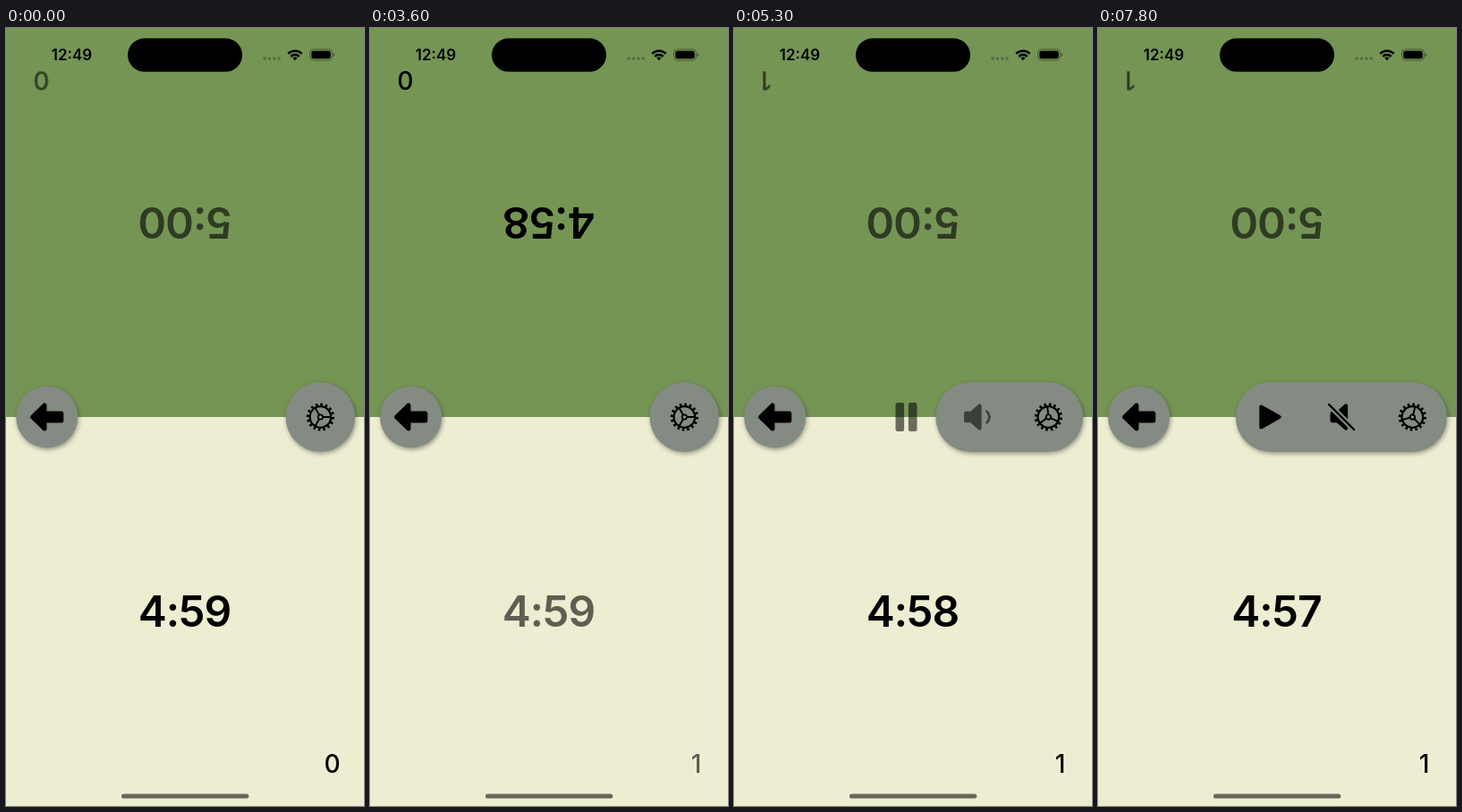
These frames come from a looping animation (400 px wide and 868 px high, 8 s). An HTML page:

```html
<!DOCTYPE html>
<html lang="en">
<head>
<meta charset="utf-8">
<title>Two-player clock</title>
<style>
  html, body { margin: 0; width: 100%; height: 100%; overflow: hidden; background: #ecedd1; }
  svg { display: block; width: 400px; height: 868px; }
  text { font-family: Inter, "Liberation Sans", sans-serif; text-anchor: middle; }
  .time { font-size: 48px; font-weight: 600; letter-spacing: -0.02em; }
  .count { font-size: 28px; font-weight: 500; }
  .button { fill: #848b83; filter: drop-shadow(1.5px 2px 2.5px rgba(0, 0, 0, .36)); }
  .solid { stroke: #000; stroke-linejoin: round; }
  .line { fill: none; stroke: #000; stroke-linecap: round; }
</style>
</head>
<body>
<svg viewBox="0 0 400 868">
  <defs>
    <path id="speaker" class="solid" stroke-width="4" d="M259 429.7H265L274.6 421.3V446.7L265 438.3H259Z"/>
  </defs>

  <rect width="400" height="868" fill="#ecedd1"/>
  <rect width="400" height="434" fill="#759555"/>

  <!-- status bar -->
  <text x="73.5" y="36" font-size="17" font-weight="600">12:49</text>
  <rect x="136" y="11.5" width="128" height="37.3" rx="18.65"/>
  <g opacity=".27">
    <circle cx="289" cy="34" r="1.8"/><circle cx="294.4" cy="34" r="1.8"/>
    <circle cx="299.8" cy="34" r="1.8"/><circle cx="305.2" cy="34" r="1.8"/>
  </g>
  <g fill="none" stroke="#000" stroke-width="2.5">
    <path d="M315.2 28.6A11 11 0 0 1 330.6 28.6"/>
    <path d="M318.2 31.8A6.7 6.7 0 0 1 327.6 31.8"/>
  </g>
  <path d="M320.3 33.5A3.8 3.8 0 0 1 325.5 33.5L322.9 36.2Z"/>
  <rect x="339.5" y="23.8" width="25" height="12.2" rx="3.9" fill="none" stroke="#000" opacity=".38"/>
  <rect x="341.2" y="25.5" width="21.6" height="8.8" rx="2.5"/>
  <path d="M365.7 27.8Q367.4 28.4 367.4 29.9T365.7 32Z" opacity=".42"/>

  <!-- players -->
  <g id="top">
    <text class="time" transform="rotate(180 200 217)" x="199.5" y="234.3"></text>
    <text class="count"></text>
  </g>
  <g id="bottom">
    <text class="time" x="199.5" y="668.3"></text>
    <text class="count" x="364.5" y="830.5"></text>
  </g>

  <!-- back -->
  <circle class="button" cx="45.7" cy="434" r="34.5"/>
  <path class="solid" stroke-width="5" d="M29.6 434L43 421V430H61.8V438H43V447Z"/>

  <!-- menu -->
  <rect id="menu" class="button" y="395.2" height="77.8" rx="38.9"/>
  <g id="icons">
    <g id="pause">
      <rect x="180.5" y="418" width="9.6" height="32" rx="2"/>
      <rect x="194.9" y="418" width="9.6" height="32" rx="2"/>
    </g>
    <path id="play" class="solid" stroke-width="4" d="M182.3 422.6L202.6 434L182.3 445.4Z"/>
    <g id="sound">
      <use href="#speaker"/>
      <path class="line" stroke-width="2.6" d="M282.4 427.6Q288.6 434 282.4 440.4"/>
    </g>
    <g id="mute">
      <use href="#speaker" x="2.5"/>
      <path class="line" style="stroke:#848b83" stroke-width="6.6" d="M258 420L286 448"/>
      <path class="line" stroke-width="2.4" d="M258 420L286 448"/>
    </g>
  </g>
  <g id="gear" class="line">
    <circle r="14" stroke-width="3.2" stroke-linecap="butt" style="stroke-linecap:butt" pathLength="16" stroke-dasharray=".46 .54"/>
    <circle r="11.8" stroke-width="2.2"/>
    <circle r="2.7" stroke-width="1.8"/>
    <path stroke-width="1.9" d="M3.2 0H11.5M-1.6 -2.8L-5.75 -9.96M-1.6 2.8L-5.75 9.96"/>
  </g>

  <rect x="129" y="854.4" width="142.3" height="5.2" rx="2.6" fill="#67665c"/>
</svg>
<script>
const LOOP = 8000, STEP = 50;
const OPEN_AT = 5115, OPEN_MS = 350, PAUSE_AT = 6550, MUTE_AT = 7800;
const MENU_RIGHT = 390, MENU_SHUT = 312.5, MENU_OPEN = 153.8;

// start, active side, top time, top moves, bottom time, bottom moves
const states = [
  [0, "bottom", "5:00", 0, "4:59", 0],
  [900, "bottom", "5:00", 0, "4:58", 0],
  [1900, "bottom", "5:00", 0, "4:57", 0],
  [2600, "top", "5:00", 0, "4:59", 1],
  [2700, "top", "4:59", 0, "4:59", 1],
  [3600, "top", "4:58", 0, "4:59", 1],
  [4300, "bottom", "5:00", 1, "4:59", 1],
  [4650, "bottom", "5:00", 1, "4:58", 1],
  [5650, "bottom", "5:00", 1, "4:57", 1]
];

const $ = id => document.getElementById(id);
const show = (id, on) => $(id).setAttribute("visibility", on ? "visible" : "hidden");

// cubic-bezier(.42, 0, .58, 1)
function easeInOut(x) {
  if (x <= 0) return 0;
  if (x >= 1) return 1;
  let lo = 0, hi = 1, s = .5;
  for (let i = 0; i < 24; i++) {
    s = (lo + hi) / 2;
    const bx = 3 * s * (1 - s) * (.42 * (1 - s) + .58 * s) + s ** 3;
    if (bx < x) lo = s; else hi = s;
  }
  return s * s * (3 - 2 * s);
}

function setPlayer(id, time, moves, active) {
  const [clock, count] = $(id).querySelectorAll("text");
  clock.textContent = time;
  count.textContent = moves;
  $(id).setAttribute("opacity", active === id ? 1 : .6);
}

function draw(t) {
  const [, active, topTime, topMoves, bottomTime, bottomMoves] = states.findLast(s => s[0] <= t);
  setPlayer("top", topTime, topMoves, active);
  setPlayer("bottom", bottomTime, bottomMoves, active);
  const topX = topMoves ? 36 : 39.5;
  $("top").lastElementChild.setAttribute("transform", `translate(${topX} 48.4) rotate(180)`);

  const p = easeInOut((t - OPEN_AT) / OPEN_MS);
  const left = MENU_SHUT + (MENU_OPEN - MENU_SHUT) * p;
  $("menu").setAttribute("x", left);
  $("menu").setAttribute("width", MENU_RIGHT - left);
  $("icons").setAttribute("opacity", p);
  $("gear").setAttribute("transform", `translate(351.3 434) rotate(${45 * p})`);
  show("pause", t < PAUSE_AT);
  show("play", t >= PAUSE_AT);
  show("sound", t < MUTE_AT);
  show("mute", t >= MUTE_AT);
}

function tick() {
  const t = performance.now() % LOOP;
  draw(Math.floor(t / STEP) * STEP);
  requestAnimationFrame(tick);
}
tick();
</script>
</body>
</html>
```
